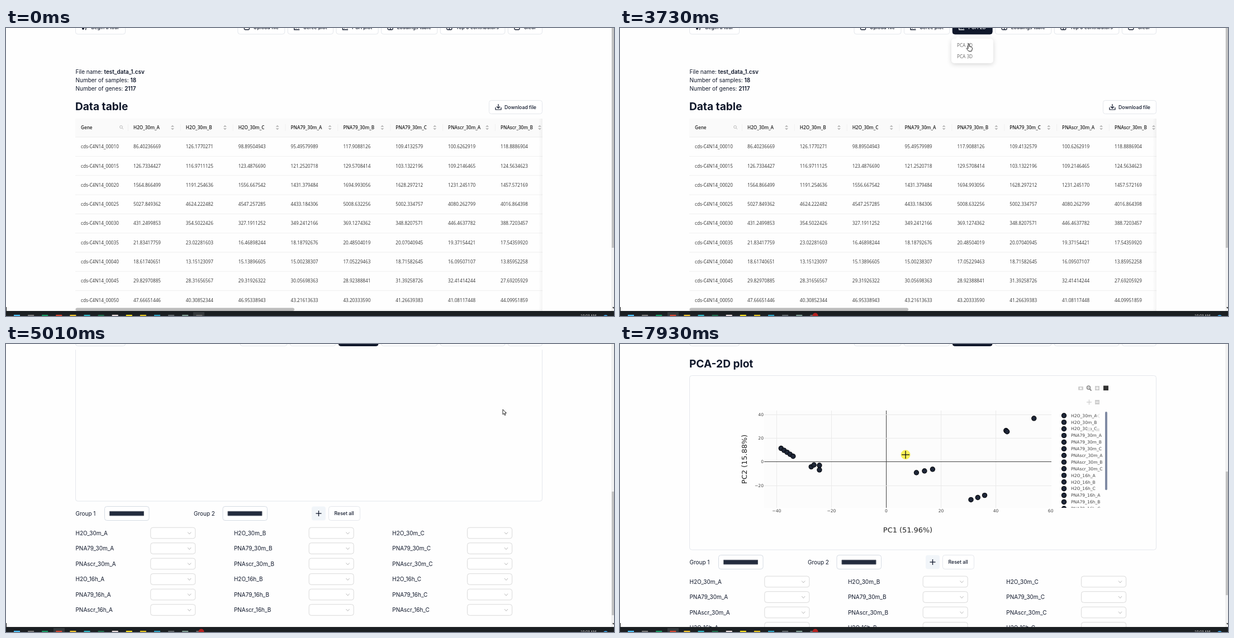
An HTML page with a canvas for the animation above (8 s loop, 1088 by 515 pixels).

```html
<!DOCTYPE html>
<html lang="en">
<head>
<meta charset="utf-8">
<title>PCA plot walkthrough</title>
<style>
html, body { margin: 0; width: 100%; height: 100%; overflow: hidden; background: #fefefe; }
canvas { display: block; }
</style>
</head>
<body>
<canvas id="stage" width="1088" height="515"></canvas>
<script>
const c = document.getElementById('stage').getContext('2d');
const INTER = 'Inter, sans-serif', OPEN = '"Open Sans", sans-serif', DEJA = '"DejaVu Sans", sans-serif';
const INK = '#0f172a', LINE = '#e4e7ec', SMALL = 8.73, BODY = 9.98, CELL = 8.2;
const TICKS = 120, TICK = 8000 / TICKS;

const samples = [];
for (const hour of ['30m', '16h'])
  for (const kind of ['H2O', 'PNA79', 'PNAscr'])
    for (const rep of 'ABC') samples.push(`${kind}_${hour}_${rep}`);

let seed = 7;
const random = () => (seed = seed * 16807 % 2147483647) / 2147483647;

// Counts scatter around the mean expression of each gene.
const rows = [108, 115, 1450, 4300, 380, 20, 16, 31, 41, 34].map(mean =>
  Array.from({ length: 8 }, () => (mean * (.8 + .4 * random())).toPrecision(10)));

// Clusters of samples: PC1, PC2 at both ends and the number of points between.
const clusters = [[-38.4, 11.4, -34, 4.7, 5], [-27.4, -4.2, -26.4, -2.6, 2], [-24.4, -3, -24.4, -6.8, 2],
  [11, -9.1, 16.9, -6.3, 3], [30.9, -32, 35.9, -28.3, 3], [43.7, 26.4, 44.1, 25.5, 2], [53.9, 36.7, 53.9, 36.7, 1]];

// [tick, value...]
const scrollKeys = [[62, 0], [67, 226], [73, 675], [75, 698], [87, 698], [92, 611]];
const mouseKeys = [[9, 882, 412], [16, 324, 75], [22, 500, 190], [27, 708, 20], [32, 581, 11], [38, 612, 9],
  [49, 612, 9], [51, 624, 28], [56, 624, 28], [58, 750, 60], [62, 750, 60], [67, 883, 121], [75, 889, 117],
  [87, 889, 117], [97, 680, 126], [100, 680, 126], [106, 600, 345], [114, 885, 12], [118, 511, 198]];

function at(keys, t, i = 1) {
  const n = keys.findIndex(k => k[0] > t);
  if (n < 0) return keys[keys.length - 1][i];
  if (!n) return keys[0][i];
  const a = keys[n - 1], b = keys[n];
  return a[i] + (b[i] - a[i]) * (t - a[0]) / (b[0] - a[0]);
}

function rect(x, y, w, h, color) { c.fillStyle = color; c.fillRect(x, y, w, h); }

function text(s, x, y, size = BODY, font = INTER, color = INK, weight = 400, align = 'left') {
  c.font = `${weight} ${size}px ${font}`;
  c.fillStyle = color;
  c.textAlign = align;
  c.fillText(s, x, y + size * .36);
  return c.measureText(s).width;
}

const title = (s, y) => text(s, 124, y, 19.1, INTER, INK, 700);
const cell = (s, x, y, color = '#333', weight = 400, align = 'left') => text(s, x, y, CELL, OPEN, color, weight, align);

function box(x, y, w, h, fill = '#fff', edge = LINE, r = 4) {
  c.beginPath();
  c.roundRect(x, y, w, h, r);
  c.fillStyle = fill;
  c.fill();
  if (edge) { c.strokeStyle = edge; c.lineWidth = 1; c.stroke(); }
}

function trace(p) {
  c.beginPath();
  for (let i = 0; i < p.length; i += 2) c.lineTo(p[i], p[i + 1]);
}

function line(color, width, ...p) {
  trace(p);
  c.strokeStyle = color;
  c.lineWidth = width;
  c.stroke();
}

function shape(color, ...p) {
  trace(p);
  c.fillStyle = color;
  c.fill();
}

function disc(x, y, r, color) {
  c.beginPath();
  c.arc(x, y, r, 0, 7);
  c.fillStyle = color;
  c.fill();
}

function ring(x, y, r, color, width) {
  c.beginPath();
  c.arc(x, y, r, 0, 7);
  c.strokeStyle = color;
  c.lineWidth = width;
  c.stroke();
}

function plus(x, y, r, color, width) {
  line(color, width, x - r, y, x + r, y);
  line(color, width, x, y - r, x, y + r);
}

function clip(x, y, w, h, draw) {
  c.save();
  c.beginPath();
  c.rect(x, y, w, h);
  c.clip();
  draw();
  c.restore();
}

const chevron = (x, y) => line('#b8b8b8', 1, x - 3, y - 1.5, x, y + 2, x + 3, y - 1.5);
const angle = (x, y, d, color) => line(color, 1, x - d, y - 3, x + d, y, x - d, y + 3);

function intro() {
  [['File name: ', 'test_data_1.csv'], ['Number of samples: ', '18'], ['Number of genes: ', '2117']].forEach(([a, b], i) => {
    const y = 78.3 + 15.1 * i;
    text(b, 124.5 + text(a, 124.5, y), y, BODY, INTER, INK, 600);
  });
  title('Data table', 140);
  box(864.5, 129.5, 95, 24);
  line(INK, 1.2, 876, 142, 876, 146, 886, 146, 886, 142);
  line(INK, 1.2, 881, 136, 881, 143);
  line(INK, 1.2, 878, 140.5, 881, 143.5, 884, 140.5);
  text('Download file', 892, 141.5, SMALL, INTER, INK, 500);
}

function tableHead(top, colX) {
  const y = top + 16;
  rect(124, top, 836, 33, '#fafafa');
  rect(124, top + 32.5, 836, 1, '#f0f0f0');
  cell('Gene', 134, y, '#222', 600);
  ring(206, y - 1, 2.4, '#aaa', .8);
  line('#aaa', .8, 208, y + 1, 210, y + 3);
  for (let j = 0; j < 8; j++) {
    const x = colX(j);
    cell(samples[j], x, y, '#222', 600);
    rect(x - 10, y - 6, 1, 12, '#f0f0f0');
    for (const d of [-1, 1]) shape('#b4b4b4', x + 67, y + d * 1.2, x + 70, y + d * 4.3, x + 73, y + d * 1.2);
  }
}

function table(s) {
  const head = Math.max(10, 162 - s), end = 539 - s, colX = j => 228 + 93.85 * j;
  clip(124, 0, 836, 515, () => {
    rows.forEach((row, i) => {
      const y = 212.3 + 34.3 * i - s;
      cell('cds-C4N14_000' + (10 + 5 * i), 134, y);
      row.forEach((v, j) => cell(v, colX(j), y));
      rect(124, y + 16.7, 836, 1, '#f0f0f0');
    });
    if (end > head + 24) tableHead(head, colX);
    const shade = c.createLinearGradient(953, 0, 960, 0);
    shade.addColorStop(0, 'rgba(0,0,0,0)');
    shade.addColorStop(1, 'rgba(0,0,0,.04)');
    rect(953, head, 7, Math.max(0, end - head), shade);
  });
  if (end > 498) {
    box(124.5, 500.5, 391.5, 5.5, '#bcbcbc', null, 3);
  } else {
    rect(124, end, 836, 9, '#f1f1f1');
    rect(134, end + 1, 383, 7, '#c1c1c1');
    shape('#a3a3a3', 131, end + 2.5, 131, end + 6.5, 128, end + 4.5);
    shape('#444', 953, end + 2.5, 953, end + 6.5, 956, end + 4.5);
  }
}

function pages(y) {
  angle(674, y, -1.5, '#c4c4c4');
  box(689, y - 9.5, 19, 19, '#fff', '#1677ff');
  for (let i = 1; i < 6; i++) cell(i, 673.5 + 25 * i, y, i === 1 ? '#1677ff' : '#333', 400, 'center');
  for (let i = -1; i < 2; i++) disc(823.5 + 4.3 * i, y, 1.1, '#c4c4c4');
  cell('212', 850, y, '#333', 400, 'center');
  angle(876, y, 1.5, '#333');
  box(896.5, y - 9.5, 62.5, 19, '#fff', '#d9d9d9');
  cell('10 / page', 904, y);
  chevron(949, y);
}

function groups(y) {
  for (let i = 0; i < 2; i++) {
    const x = 124.5 + 211.5 * i;
    text('Group ' + (i + 1), x, y);
    box(x + 52, y - 12.5, 79.5, 25, '#fff', '#d5dbe3');
    box(x + 61, y - 3.7, 61, 7.6, '#232b3d', '#555b68', 0);
  }
  box(547, y - 12.5, 25, 25, '#f1f5f9', null);
  plus(559.5, y, 5, INK, 1.3);
  box(577.5, y - 12.5, 56, 25);
  text('Reset all', 587.5, y, SMALL, INTER, INK, 500);
  samples.forEach((name, i) => {
    const x = 124.5 + 283.4 * (i % 3), v = y + 35 + 27.5 * Math.floor(i / 3);
    text(name, x, v);
    box(x + 134.3, v - 9.8, 80, 19.6, '#fff', '#d9d9d9');
    chevron(x + 203.7, v);
  });
}

function modebar(dark) {
  const gray = '#cfcfcf', mid = '#858585';
  box(820, 76, 9, 6.5, gray, null, 1);
  disc(824.5, 79.3, 1.8, '#fff');
  ring(838.5, 78, 3, mid, 1.5);
  line(mid, 1.8, 840.5, 80.5, 843.5, 83.5);
  line(mid, 1, 837, 78, 840, 78);
  rect(850, 75, 8, 8, gray);
  plus(854, 79, 2.5, '#fff', 1.2);
  rect(850, 100, 8, 8, gray);
  line('#fff', 1.2, 851.5, 104, 856.5, 104);
  rect(865, 74.5, 9, 8.5, dark ? '#333' : '#666');
  plus(839.5, 104, 4.5, gray, 1.3);
  line('#e2e2e2', 1.2, 851, 125, 858, 132);
  line('#e2e2e2', 1.2, 858, 125, 851, 132);
  rect(836, 150, 7, 6, '#e8e8e8');
  rect(851, 151, 7, 5, '#e2e2e2');
}

function plot(bottom, tools, tall) {
  const h = bottom - 119, zero = 119 + .527 * h;
  const px = v => 476.5 + 4.903 * v, py = v => zero - v * h / 82.2;
  const label = (s, x, y, align) => text(String(s).replace('-', '−'), x, y, 7.6, DEJA, '#444', 400, align);
  const axis = (s, x, y) => text(s, x, y, 12.9, DEJA, '#222', 400, 'center');
  const dot = (x, y) => { disc(x, y, 4.7, '#05070b'); disc(x, y, 3.6, '#1f2738'); };
  rect(258, 119, 514, h, '#fcfcfc');
  for (let v = -40; v <= 60; v += 20) {
    if (v < 60) line(v ? '#e9e9e9' : '#444', 1, px(v), 119, px(v), bottom);
    label(v, px(v), bottom + 5.5, 'center');
  }
  for (let v = 40; v >= -20; v -= 20) {
    const y = Math.floor(py(v)) + .5;
    line(v ? '#e9e9e9' : '#444', 1, 258, y, 772, y);
    label(v, 257, y, 'right');
  }
  axis('PC1 (51.96%)', 515, bottom + 39.5);
  c.save();
  c.translate(222.5, (119 + bottom) / 2);
  c.rotate(-Math.PI / 2);
  axis('PC2 (15.88%)', 0, 0);
  c.restore();
  for (const [x0, y0, x1, y1, n] of clusters)
    for (let i = 0; i < n; i++) {
      const k = i / Math.max(1, n - 1);
      dot(px(x0 + (x1 - x0) * k), py(y0 + (y1 - y0) * k));
    }
  clip(785, 119, 90, h, () => samples.forEach((name, i) => {
    const y = 128 + 11.88 * i;
    dot(794.5, y);
    label(name, 807, y, 'left');
  }));
  box(868, 121, 4, h * h / 216, '#808ba4', null, 2);
  if (tools) modebar(tall);
}

function icon(kind, x, y, color) {
  if (kind === 'tour') {
    disc(x - 2.5, y + 2.5, 2, color);
    line(color, 1.3, x - 1, y + 2, x + 2, y - 4);
    line(color, 1.3, x + 2, y + 5, x + 3, y);
  } else if (kind === 'chart') {
    line(color, 1.3, x - 4.5, y - 5, x - 4.5, y + 4.5, x + 5, y + 4.5);
    line(color, 1.3, x - 1.5, y + 2, x + 1, y - 1, x + 4, y + 2);
  } else {
    c.beginPath();
    c.roundRect(x - 4.5, y - 4.5, 9, 9, 1.5);
    c.strokeStyle = color;
    c.lineWidth = 1.3;
    c.stroke();
    if (kind === 'grid') plus(x, y, 4.5, color, 1.2);
  }
}

function toolbar(s, t) {
  const picked = t >= 53, y = -1.5 - Math.min(s, 7.5);
  if (s > 0) rect(0, 0, 1083, 10.5, '#fefefe');
  const width = name => {
    c.font = `500 ${SMALL}px ${INTER}`;
    return c.measureText(name).width + 39;
  };
  const button = (name, kind, x, fill = '#fff', color = INK) => {
    box(x, y - 12.5, width(name), 25, fill, fill === INK ? INK : LINE);
    icon(kind, x + 16, y, color);
    text(name, x + 28, y, SMALL, INTER, color, 500);
  };
  button('Begin a tour', 'tour', 124.5);
  let x = 965;
  for (const [name, kind] of [['Clear', 'box'], ['Top 5 contributors', 'grid'], ['Loadings table', 'grid'],
    [picked ? 'PCA 2D' : 'PCA plot', 'chart'], ['Scree plot', 'chart'], ['Upload file', 'box']]) {
    x -= width(name) + 5.5;
    if (!name.startsWith('PCA')) button(name, kind, x);
    else if (picked) button(name, kind, x, INK, '#f8fafc');
    else button(name, kind, x, t > 29 ? '#f1f5f9' : '#fff');
  }
}

function menu(t) {
  const a = Math.min((t - 40) / 3, (58 - t) / 2, 1);
  if (a <= 0) return;
  c.save();
  c.globalAlpha = a;
  c.shadowColor = 'rgba(0,0,0,.16)';
  c.shadowBlur = 9;
  c.shadowOffsetY = 2;
  box(593, 19, 75, 44, '#fff', null, 5);
  c.shadowColor = 'transparent';
  shape('#fff', 600, 19.5, 605, 14.5, 610, 19.5);
  cell('PCA 2D', 603, 31.5, '#666');
  cell('PCA 3D', 603, 51, '#666');
  c.restore();
}

function taskbar(t) {
  const icons = '#4cc2ff #777 #169b62 #d6452f #f0c330 #2cb5c4 #1c6b4a #e8dcdc #f5dc20 #e0c020 #2a9fc0 #5d6468 #7d9a90 #666';
  rect(0, 506, 1088, 9, '#1b1f22');
  rect(0, 499, 1, 7, '#111');
  rect(t >= 53 ? 85 : 335, 508, 20, 7, '#34383b');
  icons.split(' ').forEach((color, i) => rect(14 + 25.1 * i, 512.8, 11, 3, color));
  c.globalAlpha = Math.max(0, Math.min(1, (t - 1) / 4));
  disc(349.5, 514.5, 5, '#b3201f');
  c.globalAlpha = 1;
  text('10:03 AM', 1028, 515, 6.5, OPEN, '#ddd');
  disc(1073, 517, 4, '#3a9bdc');
}

function scrollbar(s, t) {
  rect(1083, 0, 5, 506, '#f1f1f1');
  rect(1084, -23 + .411 * s, 4, t < 62 ? 416 : 221, '#c1c1c1');
  shape('#444', 1085, 499, 1089, 499, 1087, 502);
}

function mouse(t) {
  if (t < 9) return;
  const x = at(mouseKeys, t), y = at(mouseKeys, t, 2);
  const hand = t > 25 && t < 57, clicked = t > 50 && t < 54 || t >= 118;
  if (clicked) disc(x, y, 8.5, 'rgba(247,240,70,.9)');
  if (t > 91 && x < 772 && y > 119 && y < 294) return plus(x, y, 7, '#111', 1.3);
  const p = hand
    ? [-1, 1, 0, 0, 1, 1, 1.2, 5, 5, 6, 6.5, 7.5, 6, 11, 5, 13.5, 0, 13.5, -4, 8.5, -3, 7.5, -1, 9]
    : [0, 0, 0, 9, 2, 7.2, 3.6, 10.5, 5, 9.8, 3.6, 6.7, 6.4, 6.4];
  const q = p.map((v, i) => v + (i % 2 ? y : x));
  c.lineJoin = 'round';
  shape('#fff', ...q);
  line('#222', 1, ...q, q[0], q[1]);
}

function frame() {
  const t = Math.floor(performance.now() / TICK + .1) % TICKS, s = at(scrollKeys, t);
  rect(0, 0, 1088, 515, '#fefefe');
  c.save();
  c.translate(0, -s);
  intro();
  c.restore();
  table(s);
  if (t >= 62) {
    c.save();
    c.translate(0, -s);
    pages(569);
    title('PCA-2D plot', 646);
    box(124.5, 667.5, 835, 311.5, '#fefefe');
    groups(1001);
    c.translate(0, 611);
    const tall = t >= 105;
    if (t >= 80) plot(tall ? 293 : 256, t > 92, tall);
    c.restore();
  }
  toolbar(s, t);
  menu(t);
  scrollbar(s, t);
  taskbar(t);
  mouse(t);
  requestAnimationFrame(frame);
}
requestAnimationFrame(frame);
</script>
</body>
</html>
```
